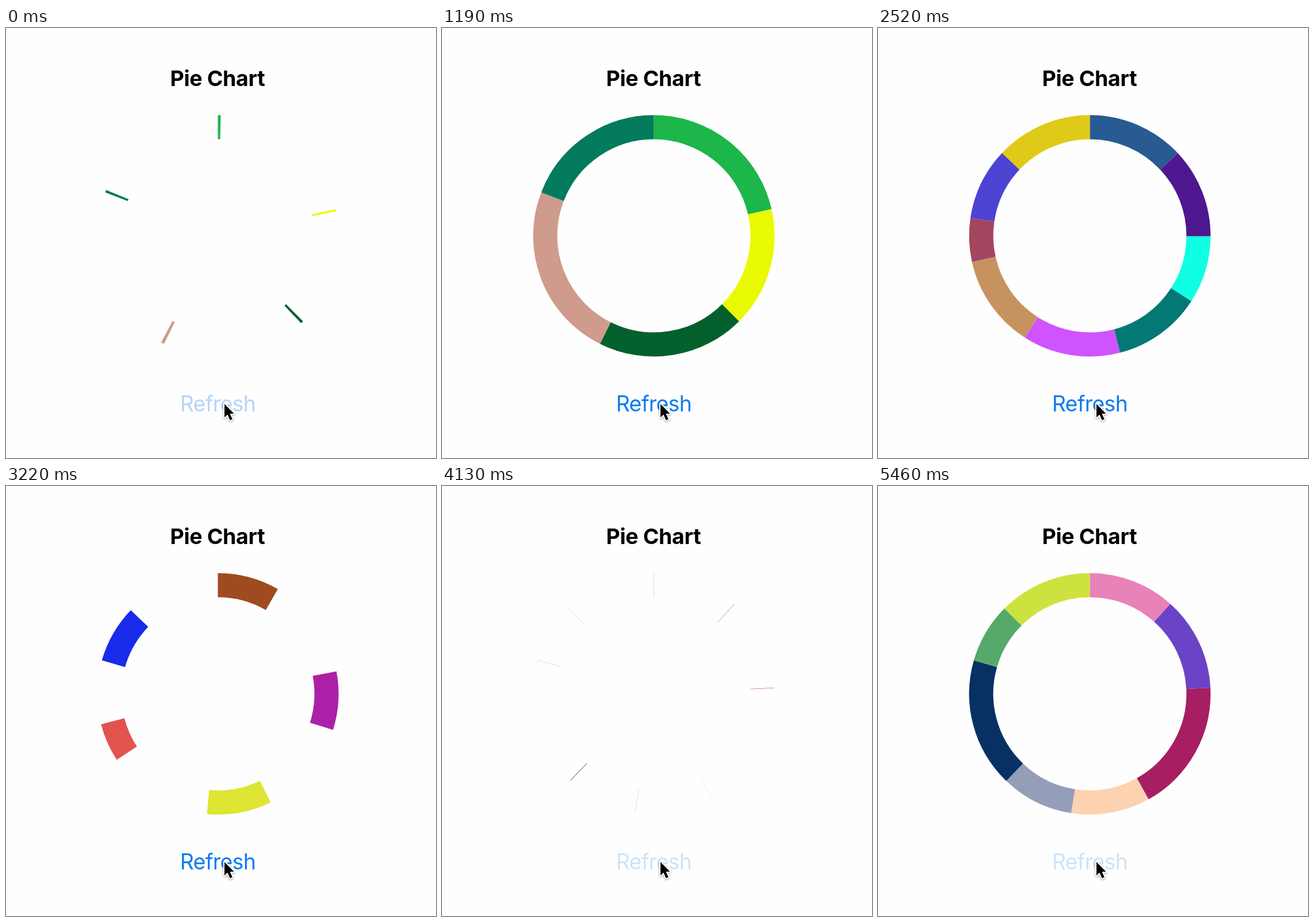
Animation of 748 by 748 pixels, one loop 5530 ms. Source, as an HTML page:

```html
<!DOCTYPE html>
<html lang="en">
<head>
<meta charset="utf-8">
<title>Pie Chart</title>
<style>
  html, body { margin: 0; width: 100%; height: 100%; overflow: hidden; background: #fefefe; }
  svg { display: block; width: 748px; height: 748px; }
  text { font-family: Inter, Roboto, "Liberation Sans", sans-serif; font-size: 37.5px; text-anchor: middle; }
  .title { font-weight: 700; letter-spacing: -.01em; }
  .button { fill: #0a7cf0; letter-spacing: -.02em; }
  .cursor { stroke: #fff; stroke-width: 4; stroke-linejoin: round; paint-order: stroke;
    filter: drop-shadow(0 1.5px 1.5px rgba(0, 0, 0, .4)); }
</style>
</head>
<body>
<svg viewBox="0 0 748 748">
  <text class="title" x="368" y="101">Pie Chart</text>
  <g id="ring" fill="none" stroke-width="42"></g>
  <text class="button" id="button" x="368.4" y="667">Refresh</text>
  <path class="cursor" d="M380 654V677.5L385.4 672.6L389.6 682.3L393.8 680.5L389.6 670.9L396.6 670.7Z"/>
</svg>
<script>
const LOOP = 5530, STEP = 70;
const GROW = 1050, FADE = 262;
const HOLD_BEFORE = 103, HOLD_AFTER = 33, DIM = 0.2;
const CX = 368.5, CY = 361.5, R = 189;

// Each chart: start time, slice start angles (degrees from the top), slice colours.
const charts = [
  { start: -99, angles: [0, 77.2, 135.1, 206.5, 291.1],
    colors: ['#1cb64a', '#eafa03', '#03602d', '#ce9b8c', '#037b5c'] },
  { start: 1320, angles: [0, 46.8, 90.3, 122.8, 165.5, 212.6, 257.5, 278.6, 313.3],
    colors: ['#285a94', '#4f178f', '#0fffe3', '#047874', '#cf53ff', '#c69360', '#a34660', '#4c43d3', '#dfca17'] },
  { start: 2765, angles: [0, 79.3, 154.1, 236.9, 286.1],
    colors: ['#9f4b20', '#ac20a8', '#dee532', '#e25350', '#172be9'] },
  { start: 4090, angles: [0, 41.8, 87.1, 150.9, 188.9, 223.8, 286.1, 315],
    colors: ['#e882b8', '#6b43c6', '#a71e62', '#fdd2b1', '#949eb9', '#083163', '#55a96a', '#cee23f'] }
];
const taps = [...charts.map(c => c.start), 5543];

const ring = document.getElementById('ring');
const button = document.getElementById('button');
const slices = Array.from({ length: 9 }, () =>
  ring.appendChild(document.createElementNS('http://www.w3.org/2000/svg', 'path')));

const clamp = x => Math.min(1, Math.max(0, x));
const ease = x => x < 0.5 ? 2 * x * x : 1 - 2 * (1 - x) ** 2;

function point(deg) {
  const a = deg * Math.PI / 180;
  return (CX + R * Math.sin(a)).toFixed(3) + ' ' + (CY - R * Math.cos(a)).toFixed(3);
}

function arc(from, to) {
  return `M${point(from)}A${R} ${R} 0 0 1 ${point(to)}`;
}

function drawRing(t) {
  const { start, angles, colors } = charts.filter(c => c.start <= t).pop();
  const grown = ease(clamp((t - start) / GROW));
  slices.forEach((slice, i) => {
    if (i >= angles.length) {
      slice.setAttribute('d', '');
      return;
    }
    const from = angles[i], to = angles[i + 1] ?? 360;
    slice.setAttribute('d', arc(from, from + (to - from) * grown));
    slice.setAttribute('stroke', colors[i]);
  });
}

// The label dims at once when pressed and eases back after release.
function drawButton(t) {
  const tap = taps.filter(s => s - HOLD_BEFORE <= t).pop();
  const back = ease(clamp((t - tap - HOLD_AFTER) / FADE));
  button.style.opacity = DIM + (1 - DIM) * back;
}

function draw(ms) {
  const t = Math.floor((ms % LOOP + 0.5) / STEP) * STEP % LOOP;
  drawRing(t);
  drawButton(t);
}

const origin = performance.now();
function tick() {
  draw(performance.now() - origin);
  requestAnimationFrame(tick);
}
tick();
</script>
</body>
</html>
```
